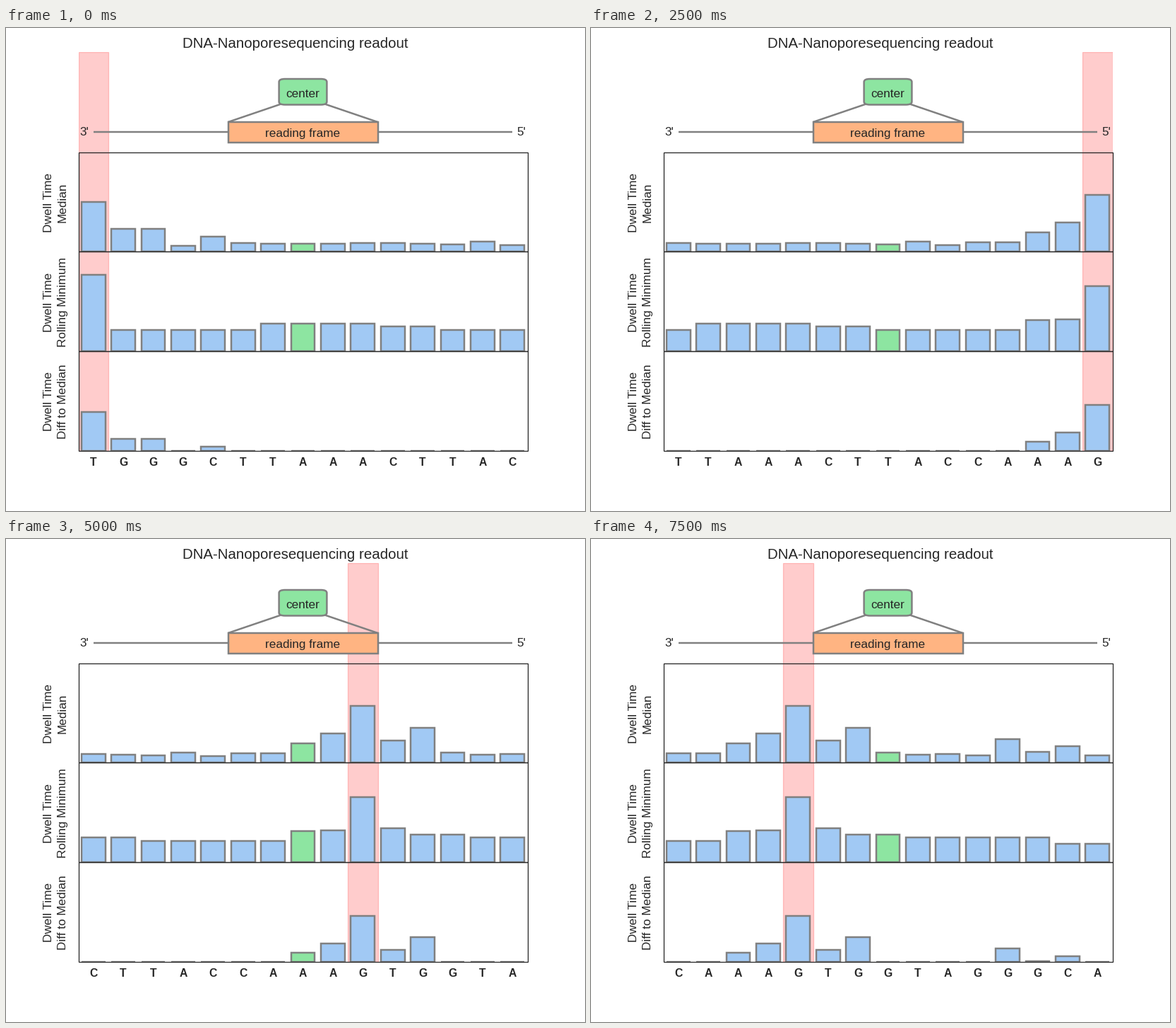
These frames come from a looping animation (820 by 683 pixels, 8 s). A matplotlib script:

```python
import numpy as np
import matplotlib.pyplot as plt
from matplotlib.animation import FuncAnimation
from matplotlib.patches import FancyBboxPatch, Rectangle

W, H, DPI = 820, 683, 100
PT = 72 / DPI  # points per pixel
BLUE, GREEN, ORANGE = "#a1c9f4", "#8de5a1", "#ffb482"
GRAY, INK = "#808080", "#262626"
EDGE = 2.5 * PT

LEFT, RIGHT, TOP = 102.5, 738.5, 34
ROWS = [176, 316.5, 457.5, 598]
SLOTS, CENTER, STEPS = 15, 7, 16
COL = (RIGHT - LEFT) / SLOTS

SEQ = "TGGGCTTAAACTTACCAAAGTGGTAGGGCA"
MARKED = (0, 19)
median = np.array([70, 32, 32, 8.5, 21, 12.3, 11.5, 11.5, 11.5, 12.3,
                   12.3, 11.5, 10.5, 14.3, 9.5, 13.3, 13.3, 27.5, 41, 80,
                   31.5, 49.5, 14.3, 11.5, 12.5, 10.5, 33.5, 15.3, 23, 10.5])
minimum = np.repeat([108, 30, 39, 35, 30, 44.5, 45.5, 92, 48.5, 39.7, 35, 26.5],
                    [1, 5, 4, 2, 5, 1, 1, 1, 1, 2, 5, 2])
diff = np.maximum(median - 14.8, 0)
SERIES = (median, minimum, diff)

plt.rcParams["font.family"] = "Liberation Sans"
# The small margin keeps float rounding from losing a pixel
fig = plt.figure(figsize=((W + 0.01) / DPI, (H + 0.01) / DPI), dpi=DPI,
                 facecolor="white")
ax = fig.add_axes([0, 0, 1, 1])
ax.set(xlim=(0, W), ylim=(H, 0))
ax.axis("off")


def label(x, y, s, size=17.1, **kw):
    kw = {"ha": "center", "va": "baseline", "color": INK, "zorder": 6, **kw}
    return ax.text(x, y, s, fontsize=size * PT, **kw)


def line(xs, ys):
    ax.plot(xs, ys, color=GRAY, lw=EDGE, zorder=2, solid_capstyle="butt")


def box(x0, y0, x1, y1, **kw):
    patch = Rectangle((x0, y0), x1 - x0, y1 - y0, **kw)
    ax.add_patch(patch)
    return patch


def clip_to(patch, y0, y1):
    patch.set_clip_path(Rectangle((LEFT, y0), RIGHT - LEFT, y1 - y0,
                                  transform=ax.transData))


# Strand diagram
label(410, 28, "DNA-Nanoporesequencing readout", 20.5)
line([LEFT + COL / 2, RIGHT - COL / 2], [147.5, 147.5])
x0, x1 = LEFT + 5 * COL, LEFT + 10 * COL
mid = (x0 + x1) / 2
line([x0, mid - 29.5], [133, 107])
line([x1, mid + 29.5], [133, 107])
box(x0, 133, x1, 162, fc=ORANGE, ec=GRAY, lw=EDGE, zorder=3)
ax.add_patch(FancyBboxPatch((mid - 33.9, 72), 67.8, 36.5, fc=GREEN, ec=GRAY,
                            lw=EDGE, zorder=3, mutation_aspect=0.5,
                            boxstyle="round,pad=0,rounding_size=8.5"))
label(mid, 97.5, "center")
label(mid, 153.5, "reading frame")
label(111.3, 151.5, "3'")
label(730, 151.5, "5'")

# Panels
names = ("Median", "Rolling Minimum", "Diff to Median")
bars = []
for name, y0, y1 in zip(names, ROWS, ROWS[1:]):
    box(LEFT, y0, RIGHT, y1, fc="none", ec=INK, lw=1.28 * PT, zorder=5)
    for x, s in ((65, "Dwell Time"), (85, name)):
        label(x, (y0 + y1) / 2 + 0.5, s, rotation=90, va="center",
              rotation_mode="anchor").set_va("baseline")
    row = []
    for i in range(SLOTS):
        x = LEFT + (i + 0.5) * COL
        bar = box(x - 0.4 * COL, y1, x + 0.4 * COL, y1, ec=GRAY, lw=EDGE,
                  fc=GREEN if i == CENTER else BLUE, zorder=3)
        clip_to(bar, y0, y1)
        row.append(bar)
    bars.append(row)

letters = [label(LEFT + (i + 0.5) * COL, 618.5, "", 15.7, weight="bold")
           for i in range(SLOTS)]

spans = []
for _ in MARKED:
    span = box(0, TOP, COL, ROWS[-1], fc=(1, 0, 0, 0.2), ec=(1, 0, 0, 0.2),
               lw=1.3 * PT, zorder=1)
    clip_to(span, TOP, ROWS[-1])
    spans.append(span)


def update(step):
    for row, data, base in zip(bars, SERIES, ROWS[1:]):
        for bar, h in zip(row, data[step:]):
            bar.set_y(base - h)
            bar.set_height(h)
    for text, base in zip(letters, SEQ[step:]):
        text.set_text(base)
    for span, pos in zip(spans, MARKED):
        slot = pos - step
        span.set_x(LEFT + slot * COL)
        span.set_visible(0 <= slot < SLOTS)
    return []


anim = FuncAnimation(fig, update, frames=STEPS, interval=500,
                     repeat=True, repeat_delay=0, blit=False)
plt.show()
```
